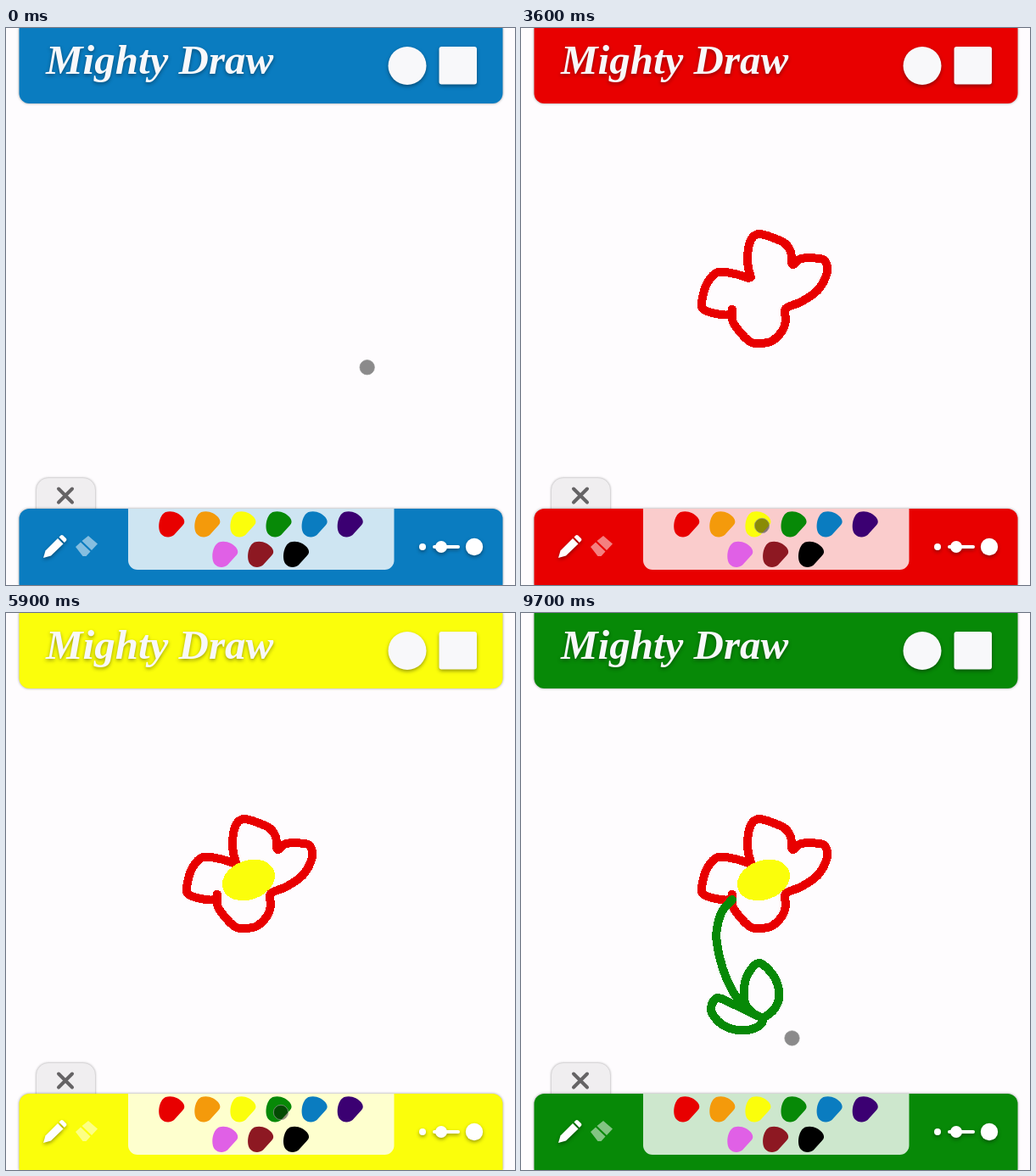
Write an HTML page that moves like this. It is 600 by 657 pixels and loops after 9.8 s.

```html
<!DOCTYPE html>
<html lang="en">
<head>
<meta charset="utf-8">
<title>Mighty Draw</title>
<style>
html, body { margin: 0; width: 100%; height: 100%; overflow: hidden; background: #fefcfe; }
svg { display: block; width: 100%; height: 100%; }
.soft { filter: drop-shadow(0 2px 2px rgba(0,0,0,.38)); }
.edge { filter: drop-shadow(0 0 1.5px rgba(0,0,0,.4)); }
.title { font: italic bold 49px "Liberation Serif", serif; }
.ink path { fill: none; stroke-width: 10; stroke-linecap: round; stroke-linejoin: round; shape-rendering: crispEdges; }
</style>
</head>
<body>
<svg viewBox="0 0 600 657">
  <rect width="600" height="657" fill="#fefcfe"/>
  <g class="ink" id="ink"></g>

  <path class="edge theme" d="M15.500 0H585.500V77a12 12 0 0 1-12 12H27.500a12 12 0 0 1-12-12Z"/>
  <g class="soft" fill="#f8f8fa">
    <text class="title" x="47" y="54">Mighty Draw</text>
    <circle cx="473" cy="44.500" r="22.500"/>
    <rect x="510.500" y="22" width="44.500" height="44.500" rx="3"/>
  </g>

  <path class="edge" fill="#f0eef0" d="M36 570V545a14 14 0 0 1 14-14H91a14 14 0 0 1 14 14V570Z"/>
  <path d="M62 543.500l16 16m0-16l-16 16" stroke="#656365" stroke-width="4" stroke-linecap="round"/>
  <path class="edge theme" d="M15.500 657V579a12 12 0 0 1 12-12H573.500a12 12 0 0 1 12 12V657Z"/>
  <path fill="#fff" fill-opacity=".8" d="M144 567H457.500V628a11 11 0 0 1-11 11H155a11 11 0 0 1-11-11Z"/>
  <g id="swatches"></g>

  <g class="soft" fill="#fff">
    <path d="M44 625l2.500-8.500L61 602l6.500 6.500L53 622.500Z"/>
    <path d="M62.500 600.500l2-2q1.500-1 3 .300l3.300 3.300q1.200 1.500 0 3l-2 2Z"/>
  </g>
  <path fill="#fff" fill-opacity=".5" d="M82 612l6-5.500 11.500 11-5 5.500h-4ZM89.500 605l7.500-6 11 9.500-7 7.500Z"/>
  <g class="soft" fill="#fff">
    <circle cx="491" cy="612" r="4"/>
    <rect x="503" y="610" width="32" height="4" rx="2"/>
    <circle cx="513" cy="612" r="7"/>
    <circle cx="552" cy="612" r="10.200"/>
  </g>
  <circle id="cursor" r="8.700" fill="#000" fill-opacity=".45" stroke="#969696" stroke-opacity=".7"/>
</svg>
<script>
const LOOP = 9800;
const BLUE = '#0a7cc0', RED = '#e80000', YELLOW = '#fbfe0b', GREEN = '#078907';
const $ = id => document.getElementById(id);

function add(parent, attrs) {
  const el = document.createElementNS('http://www.w3.org/2000/svg', 'path');
  for (const key in attrs) el.setAttribute(key, attrs[key]);
  return parent.appendChild(el);
}

// Palette
const BLOB = 'M-7-14C1-16.500 9-13 13-8C16-4 16-1 13 2L3 13C-1 16.500-8 16.500-12 12C-17 6-15-10-7-14Z';
[RED, '#f49a0b', YELLOW, GREEN, BLUE, '#3b0072', '#e060e6', '#8d1822', '#000'].forEach((fill, i) => {
  const x = i < 6 ? 195 + i * 42.1 : 258 + (i - 6) * 41.9;
  add($('swatches'), { d: BLOB, fill, transform: `translate(${x} ${i < 6 ? 585 : 620.5})` });
});

// Strokes
const parse = s => s.split(' ').map(p => p.split(',').map(Number));

function smooth(pts) {
  const at = i => pts[Math.max(0, Math.min(pts.length - 1, i))];
  let d = 'M' + pts[0];
  for (let i = 0; i < pts.length - 1; i++) {
    const [a, b, c, e] = [at(i - 1), at(i), at(i + 1), at(i + 2)];
    const p = [0, 1].map(k => b[k] + (c[k] - a[k]) / 6);
    const q = [0, 1].map(k => c[k] - (e[k] - b[k]) / 6);
    d += `C${p} ${q} ${c}`;
  }
  return d;
}

function spiral(cx, cy, rx, ry, tilt, turns) {
  const pts = [], steps = turns * 14;
  for (let i = 0; i <= steps; i++) {
    const a = i / 14 * 2 * Math.PI;
    const r = Math.min(1, i / (steps - 14));
    const x = rx * r * Math.cos(a), y = ry * r * Math.sin(a);
    pts.push([cx + x * Math.cos(tilt) - y * Math.sin(tilt), cy + x * Math.sin(tilt) + y * Math.cos(tilt)]);
  }
  return pts;
}

const petals = '268,295 252,290 232,288 220,300 214,318 214,331 230,337 246,338 249,332 250,347 ' +
  '262,363 272,371 283,372 296,369 308,357 312,345 312,331 330,323 350,309 361,288 359,276 ' +
  '352,272 330,272 320,279 318,264 311,254 296,247 280,243 271,250 267,268 268,283 271,294';
const stem = '249,338 237,352 231,372 231,390 238,420 250,447 263,464 275,473 285,478';
const rightLeaf = '285,478 297,469 304,455 302,437 293,422 280,413 268,425 263,442 264,460 271,470';
const leftLeaf = '285,478 262,467 245,459 231,454 224,465 227,475 238,486 255,492 272,491 283,485 286,478';

// Each stroke: colour, points, and [time, share of length] stops
const strokes = [
  [RED, parse(petals), [[1600, 0], [2200, .264], [3100, 1]]],
  [YELLOW, spiral(286, 315, 27, 18, -.35, 4), [[4150, 0], [5400, 1]]],
  [GREEN, parse(stem), [[6550, 0], [7200, 1]]],
  [GREEN, parse(rightLeaf), [[7300, 0], [8100, 1]]],
  [GREEN, parse(leftLeaf), [[8300, 0], [9000, .45], [9400, 1]]]
].map(([stroke, pts, stops]) => {
  const el = add($('ink'), { d: smooth(pts), stroke });
  return { el, stops, pts, len: el.getTotalLength() };
});

function between(stops, t) {
  if (t <= stops[0][0]) return stops[0].slice(1);
  for (let i = 1; i < stops.length; i++) {
    const [a, b] = [stops[i - 1], stops[i]];
    if (t <= b[0]) {
      const k = (t - a[0]) / (b[0] - a[0]);
      return a.slice(1).map((v, j) => v + (b[j + 1] - v) * k);
    }
  }
  return stops[stops.length - 1].slice(1);
}

// Cursor travel outside the strokes
const travel = [[0, 426, 400], [800, 195, 587], [1000, 195, 587]];
const pauses = [
  [[3550, 284, 587], [3800, 284, 587]],
  [[5850, 324, 589], [6000, 324, 589]],
  [], [],
  [[9550, 336, 488], [9700, 319.5, 501.5]]
];
strokes.forEach(({ stops, pts }, i) => {
  travel.push([stops[0][0], ...pts[0]], [stops[stops.length - 1][0], ...pts[pts.length - 1]], ...pauses[i]);
});

const rgb = hex => [1, 3, 5].map(i => parseInt(hex.slice(i, i + 2), 16));
const theme = [];
[[0, BLUE], [920, RED], [3780, YELLOW], [5920, GREEN]].forEach(([t, hex], i, all) => {
  if (i) theme.push([t, ...rgb(all[i - 1][1])]);
  theme.push([t + (i && 300), ...rgb(hex)]);
});

const LAG = 30;
function draw(t) {
  let [x, y] = between(travel, t);
  for (const { el, stops, len } of strokes) {
    const [share] = between(stops, t - LAG);
    const start = stops[0][0], end = stops[stops.length - 1][0];
    el.style.display = t >= start ? '' : 'none';
    el.style.strokeDasharray = share < 1 ? `${Math.max(.1, share * len)} ${len + 20}` : 'none';
    if (t >= start && t <= end) ({ x, y } = el.getPointAtLength(between(stops, t)[0] * len));
  }
  $('cursor').setAttribute('transform', `translate(${x} ${y})`);
  const fill = `rgb(${between(theme, t).map(Math.round)})`;
  document.querySelectorAll('.theme').forEach(el => el.setAttribute('fill', fill));
}

const begin = performance.now();
function tick() {
  draw((performance.now() - begin) % LOOP);
  requestAnimationFrame(tick);
}
tick();
</script>
</body>
</html>
```
